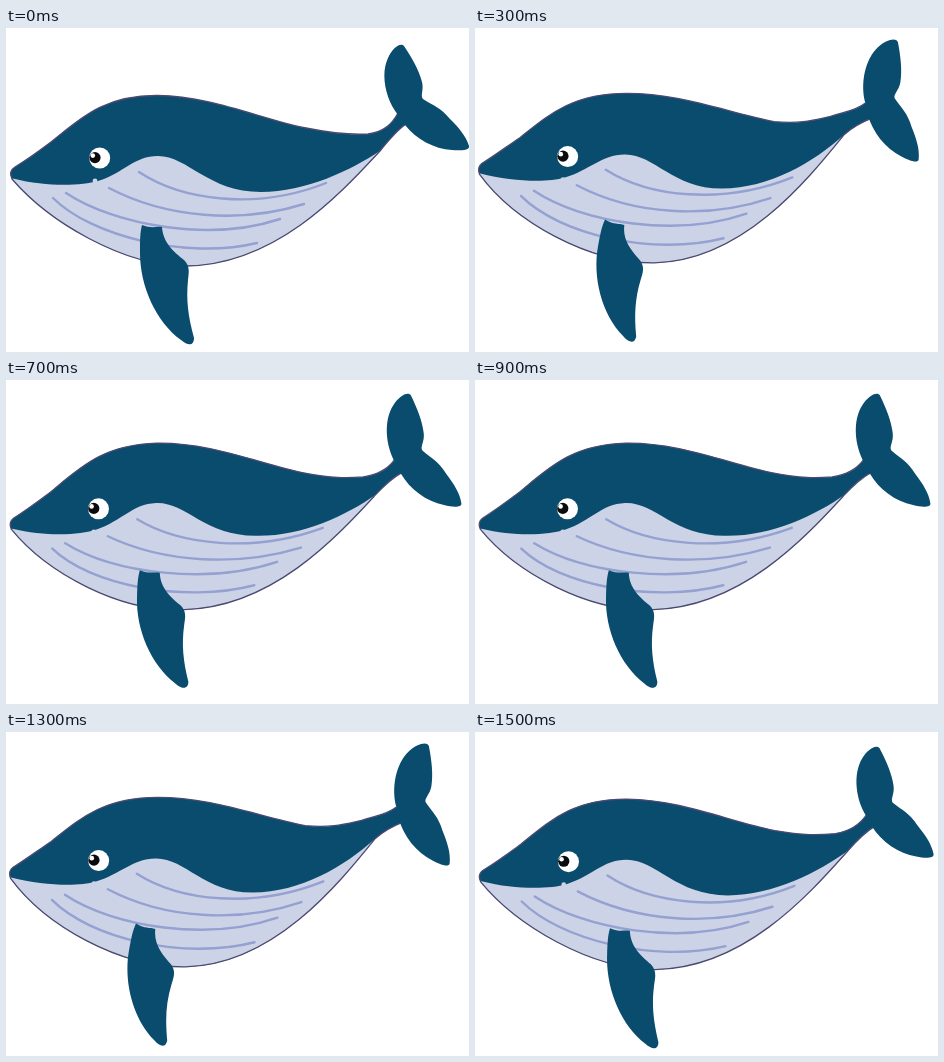
Recreate the animation shown at these times as an HTML page. Size 463 by 324 pixels, loop 1600 ms.

```html
<!DOCTYPE html>
<html lang="en">
<head>
<meta charset="utf-8">
<title>Swimming whale</title>
<style>
  html, body { margin: 0; width: 100%; height: 100%; overflow: hidden; background: #fff; }
  svg { display: block; width: 463px; height: 324px; }
  .skin { fill: #094c6e; }
  .belly { fill: #ccd3e6; }
  .edge { fill: none; stroke: #4b4a72; stroke-width: 1.3; stroke-linejoin: round; }
  .fold { fill: none; stroke: #94a1d1; stroke-width: 2.4; stroke-linecap: round; }
</style>
</head>
<body>
<svg viewBox="0 0 463 324">
  <path id="body" class="skin"/>
  <path id="belly" class="belly"/>
  <path id="edge" class="edge"/>
  <path id="folds" class="fold"/>
  <path id="tail" class="skin" d="M392 87C380 72 374 47 382 30C386 21 394 14 398 18C406 30 413 42 416 54C418 62 414 68 417 71C428 78 434 79 444 91C453 100 460 108 463 118C464 122 455 123 446 122C428 121 410 111 399 97L391 96Z"/>
  <path id="flipper" class="skin" d="M136 197C146 201 150 198 156 199C157 215 168 224 178 232C184 238 183 244 182 252C180 272 182 288 188 310C188 318 182 318 175 312C150 294 134 258 134 225C134 212 134 205 136 197Z"/>
  <g id="face">
    <circle class="belly" cx="89" cy="153" r="2.4"/>
    <circle cx="93.7" cy="130" r="10.5" fill="#fff"/>
    <circle cx="89" cy="129.6" r="5.6" fill="#0b0b0d"/>
    <circle cx="86.8" cy="127.6" r="2.3" fill="#fff"/>
  </g>
</svg>
<script>
const $ = id => document.getElementById(id);
const FRAME = 100, COUNT = 16;

// Tail swing per step, mirrored in the second half of the loop
const SWING = [0, .24, .62, .92, 1, .86, .6, .32, .17];

// Each contour in its tail-up and tail-down pose
const spine = {
  up: 'M6 151C4 147 4 142 9 139C22 131 33 123 45 114C75 90 98 67 152 67.5C205 68 255 91 300 100C330 106 345 107 362 106C378 104 386 96 392 85L400 96C390 103 382 113 374 123',
  down: 'M4.5 146C3 142 3 138 7 135C20 127 32 118 45 109.5C75 86 98 66 152 66.5C205 67 250 85 300 95C326 97 340 92 356 88C370 83 382 82 391 75L397 90.5C388 94 378 99 370 106'
};
const mouth = {
  up: 'M7 150.5C40 159 75 158 92 153C118 145 128 128 152 128C182 128 202 164 255 164C300 164 345 142 374 123',
  down: 'M5 145C38 153.5 72 155 90 150C115 143 126 128 150 128C180 128 198 163 247 163C295 162 338 136 370 106'
};
const under = {
  up: 'C335 165 270 237 180 238C116 238 42 193 6 151Z',
  down: 'C333 153 268 236 180 237.5C114 237 39 194 4.5 146Z'
};
const folds = {
  up: 'M133 144C175 172 250 183 320 155M103 160C160 190 235 196 298 176'
    + 'M60 165C110 198 205 214 274 191M47 170C85 208 180 232 251 215',
  down: 'M131 143C174 171 248 180 318 151M102 158C159 189 233 194 296 172'
    + 'M59 163C109 197 203 212 272 188M46 168C84 207 178 231 249 213'
};

const body = [spine.up + under.up, spine.down + under.down];
const shapes = [
  ['body', ...body],
  ['edge', ...body],
  ['belly', mouth.up + under.up, mouth.down + under.down],
  ['folds', folds.up, folds.down]
].map(([id, a, b]) => ({ el: $(id), a, to: b.match(/[\d.]+/g).map(Number) }));

// Blend the two poses, then lift the middle of the body and flatten it a little
function morph({ el, a, to }, swing, lift) {
  let i = 0, x = 0;
  el.setAttribute('d', a.replace(/[\d.]+/g, n => {
    const v = +n + (to[i] - n) * swing;
    if (i++ % 2 === 0) {
      x = v;
      return (v * (1 - .0085 * lift)).toFixed(2) + ' ';
    }
    const rise = (8 + .024 * (v - 150)) * Math.sin(Math.PI * x / 480) ** 2;
    return (v - rise * lift).toFixed(2) + ' ';
  }));
}

// Shift a part, then turn and stretch it about its pivot
function place(id, dx, dy, angle = 0, px = 0, py = 0, stretch = 1) {
  $(id).setAttribute('transform',
    `translate(${px + dx} ${py + dy}) rotate(${angle}) scale(1 ${stretch}) translate(${-px} ${-py})`);
}

function draw(step) {
  const phase = 2 * Math.PI * step / COUNT;
  const lift = (1 - Math.cos(phase)) / 2;
  const paddle = (1 - Math.cos(2 * phase)) / 2;
  const swing = SWING[Math.min(step, COUNT - step)];
  shapes.forEach(s => morph(s, swing, lift));
  place('tail', 3.5 * swing - 1.8 * lift, -.8 * swing - .2 * lift, 25 * swing, 417, 71);
  place('flipper', -7 * paddle - 1.2 * lift, -2 * paddle - 6.5 * lift,
    12.3 * paddle, 146, 198, 1 - .03 * paddle - .022 * lift);
  place('face', -.8 * swing - 1 * lift, -1.3 * swing - .8 * lift);
}

let shown = -1;
function tick() {
  const step = Math.floor(performance.now() / FRAME) % COUNT;
  if (step !== shown) draw(shown = step);
  requestAnimationFrame(tick);
}
tick();
</script>
</body>
</html>
```
